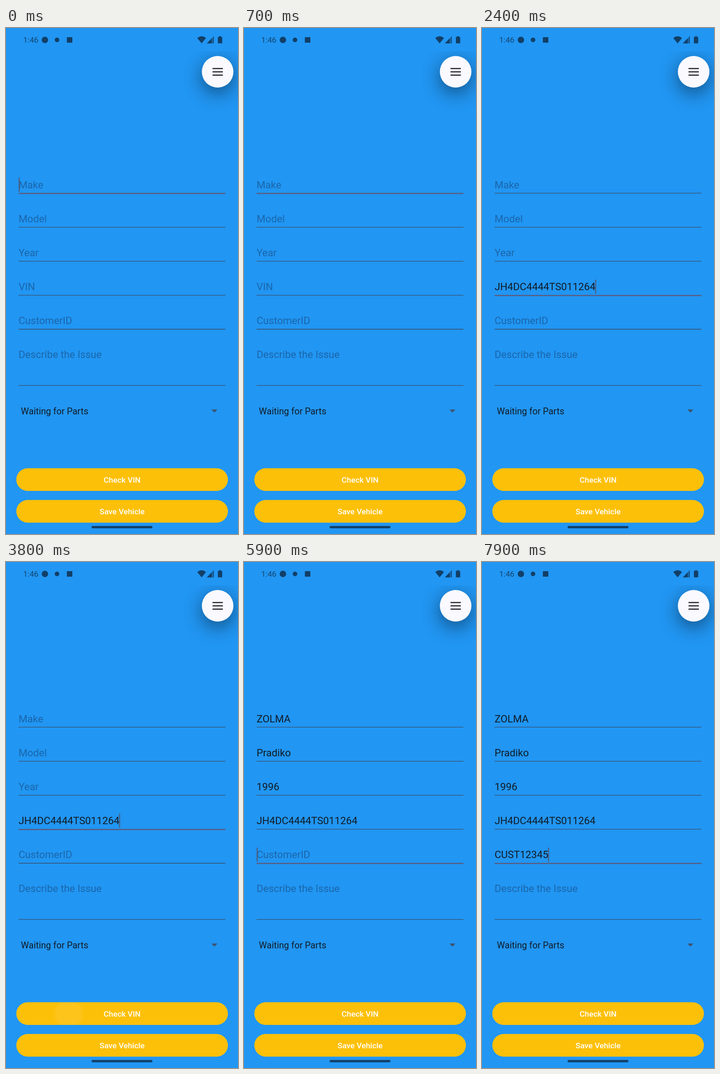
These frames come from a looping animation (507 by 1104 pixels, 8000 ms). An HTML page with a canvas:

```html
<!DOCTYPE html>
<html lang="en">
<head>
<meta charset="utf-8">
<title>Vehicle form</title>
<style>
  html, body { margin: 0; width: 100%; height: 100%; overflow: hidden; background: #2196f3; }
  canvas { display: block; width: 507px; height: 1104px; }
</style>
</head>
<body>
<canvas width="507" height="1104"></canvas>
<script>
const ctx = document.querySelector('canvas').getContext('2d');
const LOOP = 8000;
const BLUE = '#2196f3', AMBER = '#fdc009', STATUS = '#123f67';
const INK = '#121b26', HINT = '#1b66aa', RULE = '#3b506c', FOCUS = '#5b5c7c';

// Moments of the session, in ms
const VIN_TAP = 1500, VIN_PASTE = 2350, CHECK_TAP = 3700, LOOKUP_DONE = 4700;
const CUSTOMER_TAP = 5600, TYPE_START = 6200, TYPE_STEP = 160;
const VIN = 'JH4DC4444TS011264', CUSTOMER = 'CUST12345';
const HINTS = ['Make', 'Model', 'Year', 'VIN', 'CustomerID'];

function text(str, x, y, size, color, weight = 400, align = 'left') {
  ctx.font = `${weight} ${size}px Roboto, sans-serif`;
  ctx.textAlign = align;
  ctx.fillStyle = color;
  ctx.fillText(str, x, y);
}

function rect(x, y, w, h, color, radius = 0) {
  ctx.fillStyle = color;
  ctx.beginPath();
  ctx.roundRect(x, y, w, h, radius);
  ctx.fill();
}

function disc(x, y, r, color) {
  ctx.fillStyle = color;
  ctx.beginPath();
  ctx.arc(x, y, r, 0, 7);
  ctx.fill();
}

function shape(path, color) {
  ctx.fillStyle = color;
  ctx.fill(new Path2D(path));
}

function statusBar() {
  text('1:46', 37.5, 32, 17.3, '#15466f');
  disc(85, 26, 7, STATUS);
  disc(111.5, 26, 5, STATUS);
  rect(133, 20, 12, 12, STATUS, 1);
  shape('M418 22 Q427.5 14 437 22 L427.5 33.5 Z', STATUS);
  shape('M454 18 V33.5 H439 Z', '#1a6cb0');
  shape('M449.5 22.6 V33.5 H439 Z M454 18 V33.5 H452.5 V19.5 Z', STATUS);
  rect(463, 19.5, 9.5, 14, STATUS, 1.3);
  rect(465.7, 17.8, 4, 2.5, STATUS);
}

function menuButton() {
  ctx.save();
  ctx.beginPath();
  ctx.rect(0, 51, 507, 200);
  ctx.clip();
  ctx.shadowColor = 'rgba(0,0,0,.48)';
  ctx.shadowBlur = 42;
  ctx.shadowOffsetY = 12;
  disc(462.5, 95.5, 34.5, '#faf9ff');
  ctx.restore();
  for (const y of [87.3, 94.5, 101.7]) rect(451.3, y, 22.6, 2.3, '#15161c');
}

function field(i, value, focused, caretOn) {
  const y = 349.6 + i * 74.2;
  text(value || HINTS[i], 27.4, y, 22.2, value ? INK : HINT);
  if (focused) rect(27.5, y + 10.2, 452, 2.5, FOCUS);
  else rect(27.5, y + 10.2, 452, 1.3, RULE);
  if (focused && caretOn) {
    const x = value ? 26.6 + ctx.measureText(value).width : 27.6;
    rect(x, y - 23.2, 2.4, 30.5, '#4d5f80');
  }
}

function button(label, y, sincePress = -1) {
  rect(22.5, y, 462.5, 49.4, AMBER, 24.7);
  if (sincePress > 0 && sincePress < 400) {
    ctx.save();
    ctx.clip();
    const r = 34 * (sincePress / 100) ** 1.7;
    const glow = ctx.createRadialGradient(137, y + 25, r * .75, 137, y + 25, r);
    const alpha = .1 * (1 - sincePress / 400);
    glow.addColorStop(0, `rgba(255,255,255,${alpha})`);
    glow.addColorStop(1, 'rgba(255,255,255,0)');
    disc(137, y + 25, r, glow);
    ctx.restore();
  }
  text(label, 253.7, y + 31.3, 17.27, '#fff', 500, 'center');
}

function draw(t) {
  const found = t >= LOOKUP_DONE;
  const typed = Math.floor((t - TYPE_START) / TYPE_STEP) + 1;
  const chars = Math.max(0, Math.min(CUSTOMER.length, typed));
  const values = [
    found ? 'ZOLMA' : '',
    found ? 'Pradiko' : '',
    found ? '1996' : '',
    t >= VIN_PASTE ? VIN : '',
    CUSTOMER.slice(0, chars)
  ];
  const active = t < VIN_TAP ? 0 : t < CUSTOMER_TAP ? 3 : 4;

  // The caret blink restarts at every tap, paste or key
  const lastInput = chars ? TYPE_START + (chars - 1) * TYPE_STEP
    : [CUSTOMER_TAP, VIN_PASTE, VIN_TAP, -200].find(m => m <= t);
  const caretOn = (t - lastInput) % 1000 < 500;

  rect(0, 0, 507, 1104, BLUE);
  statusBar();
  menuButton();
  values.forEach((value, i) => field(i, value, i === active, caretOn));

  text('Describe the Issue', 27.4, 719.5, 22.2, HINT);
  rect(27.5, 779.3, 452, 1.3, RULE);
  text('Waiting for Parts', 32.5, 843, 19.73, INK);
  shape('M449 832.5 H462 L455.5 839 Z', '#3f5068');

  button('Check VIN', 960.6, t - CHECK_TAP);
  button('Save Vehicle', 1029.8);
  rect(187, 1086.5, 133, 5, STATUS, 2.5);
}

const start = performance.now();
function tick() {
  draw((performance.now() - start) % LOOP);
  requestAnimationFrame(tick);
}
tick();
</script>
</body>
</html>
```
